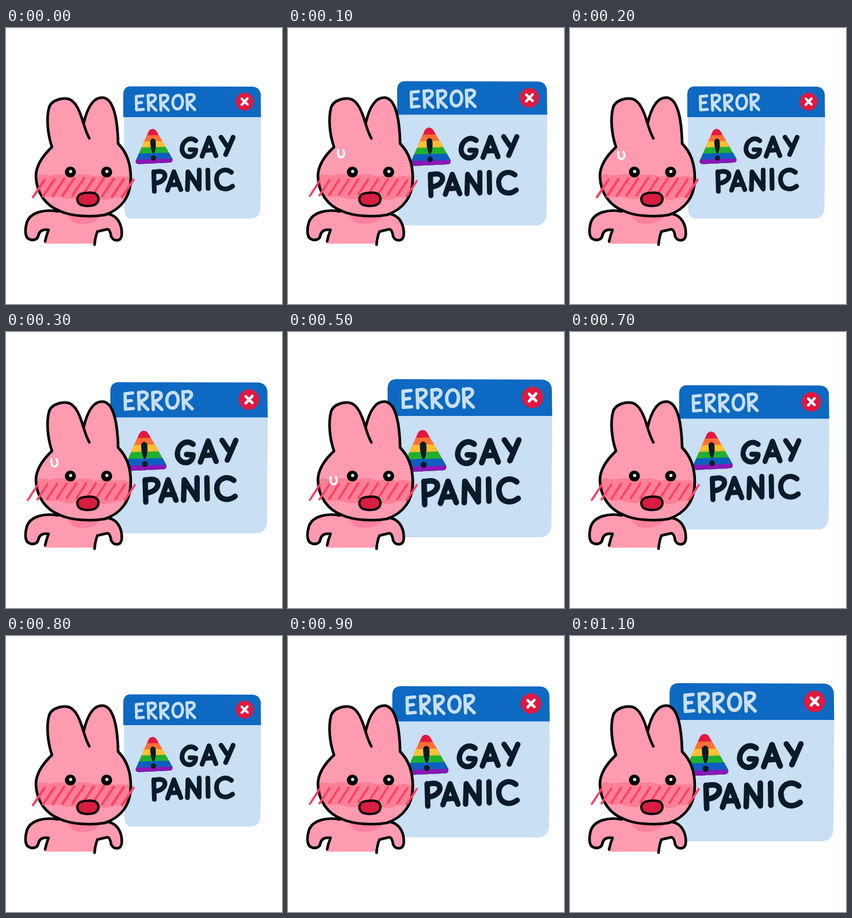
An HTML page for the animation above (1.2 s loop, 480 by 480 pixels).

```html
<!DOCTYPE html>
<html lang="en">
<head>
<meta charset="utf-8">
<title>Error: gay panic</title>
<style>
  html, body { margin: 0; width: 100%; height: 100%; overflow: hidden; background: #fff; }
  svg { display: block; width: 100vw; height: 100vh; }
  .line { fill: none; stroke: #000; stroke-width: 4.6; }
  .pink { fill: #ff9bb0; }
  .hatch { fill: none; stroke: #fd4268; }
  .letters { fill: none; stroke: #0a1a28; stroke-width: 8.2; }
  .head-letters { fill: none; stroke: #c8dff4; stroke-width: 5; }
</style>
</head>
<body>
<svg viewBox="0 0 480 480" stroke-linecap="round" stroke-linejoin="round" role="img" aria-label="ERROR: GAY PANIC">
  <defs>
    <clipPath id="sign">
      <path d="M248 180C251 174 259 174 262 180L288 225C291 230 289 234 284 234L232 236.500C226 237 224 233 227 228Z"/>
    </clipPath>
    <path id="face" d="M80 207C72 184 70 156 75 138C79 126 96 121 107 123C122 126 129 147 135 166
      C141 140 151 121 167 121C187 121 194 158 195 201C210 216 217 238 217 261
      C217 293 201 315 172 325C149 329 114 328 93 318C70 309 53 288 52 258C52 238 65 221 80 207Z"/>
    <clipPath id="faceClip"><use href="#face"/></clipPath>
    <path id="r" d="M0 1L1 27M0 2C15-4 19 10 2 15L14 27"/>
  </defs>

  <g id="panel">
    <path fill="#c8dff4" d="M205 150H443.500L442.500 314Q441 330 427 331.500L219 331.500Q207 331 205.500 317Z"/>
    <path fill="#0d69c1" d="M204 155V114Q205 101 218 101.500L429 102Q441 103 443 115L443.500 155Z"/>
    <g class="head-letters">
      <path d="M238 118L226.500 119L227 142.500L239 141.500M227 130.500L236 129.500"/>
      <use href="#r" x="247" y="116"/>
      <use href="#r" x="268.500" y="116"/>
      <path d="M299 117C287 118 287 141 298.500 141C310 140 310 117 299 117Z"/>
      <use href="#r" x="314.500" y="115"/>
    </g>
    <circle cx="415" cy="128" r="15.500" fill="#e2183e"/>
    <path d="M410 123L420 133M420 122.500L410 133.500" stroke="#fff" stroke-width="4.200"/>
    <g id="bands" clip-path="url(#sign)"></g>
    <path fill="#0a1a28" d="M251 196Q255 189 260 195Q262 207 258 217Q256.500 219 254.500 217Q250.500 207 251 196Z"/>
    <circle cx="256.500" cy="226" r="4.500" fill="#0a1a28"/>
    <g class="letters">
      <path d="M330 196C319 187 306 198 306 211C307 227 329 229 330 212L320 211.500"/>
      <path d="M341 223L353 191L365 222M346 213L361 212"/>
      <path d="M374 190L384 205M395 190L382 220"/>
      <path d="M257 250L258 284M257 251C283 243 282 267 260 270"/>
      <path d="M281 282L292 250L304 281M285 273L301 272"/>
      <path d="M315.500 281L316.500 250L336 280L336 247"/>
      <path d="M351 247L351.500 279"/>
      <path d="M392 251C381 242 366 249 366 263C367 282 384 283 394 275"/>
    </g>
  </g>

  <path class="pink" d="M90 319C70 315 42 319 36 339C33 350 33 359 37 365C44 371 54 369 56 362Q58 350 74 351L66 375
    H154L158 354L177 350Q181 353 183 363C188 372 199 371 201 362C203 346 196 325 172 323Z"/>
  <path d="M107 326Q112 341 134 341Q156 340 164 326Z" fill="#ff819b"/>
  <path class="line" d="M90 319C70 315 42 319 36 339C33 350 33 359 37 365C44 371 54 369 56 362Q58 349 74 351Q70 361 68 371
    M170 323C196 322 203 346 201 362C199 371 188 372 183 363Q181 350 176 350L159 354Q155 364 154 377"/>

  <use href="#face" class="pink"/>
  <path clip-path="url(#faceClip)" fill="#ff7f96"
    d="M50 258Q62 252 75 257Q98 251 118 257Q136 251 154 258Q174 254 190 259Q207 255 220 262V288
    Q207 297 191 294Q177 302 161 297H120Q103 299 89 293Q72 297 50 286Z"/>
  <use href="#face" class="line"/>
  <path class="line" d="M134 163Q139 181 145 192"/>

  <g id="eyes"></g>
  <g id="blushA" class="hatch" stroke-width="4.200"></g>
  <g id="blushB" class="hatch" stroke-width="3.800"></g>
  <path d="M142 286.500C155 285 161 290 161 298C160 306 153 309.500 142 309.500C130 309.500 124 305 124 297C125 289 131 287 142 286.500Z"
    fill="#d91c40" stroke="#000" stroke-width="4"/>
  <path id="drop" d="M-5-6Q-6-1-4 4Q-1 9 3 6Q8 2 4-6" fill="none" stroke="#fff" stroke-width="3.600"/>
</svg>
<script>
const $ = id => document.getElementById(id);
const STEP = 100;
// panel scale, then sweat drop position, for each step
const STEPS = [
  [1], [1.09, 92, 218], [1, 89, 221], [1.143, 84, 227], [1, 81, 240], [1.195, 79, 258],
  [1], [1.09], [1], [1.143], [1], [1.195]
];

function add(parent, tag, attrs) {
  const el = document.createElementNS('http://www.w3.org/2000/svg', tag);
  for (const key in attrs) el.setAttribute(key, attrs[key]);
  parent.appendChild(el);
}

['#e4183e', '#ff7030', '#ffc02f', '#20b030', '#0d5fc1', '#8a17b8'].forEach((fill, i) => {
  const y = 176 + i * 10.4;
  add($('bands'), 'path', { fill, d: `M220 ${i ? y + 1 : 170}L296 ${i ? y - 1 : 170}V242H220Z` });
});

for (const x of [112, 175]) {
  add($('eyes'), 'circle', { cx: x, cy: 250.5, r: 9.6 });
  add($('eyes'), 'circle', { cx: x + 0.5, cy: 249.5, r: 2.7, fill: '#fff' });
}

function hatch(group, count, x0, gap, lean, low, high) {
  for (let i = 0; i < count; i++) {
    const x = x0 + i * gap;
    const lift = 3 * Math.sin(Math.PI * i / (count - 1));
    add(group, 'path', { d: `M${x} ${low - lift}L${x + lean} ${high - lift}` });
  }
}
hatch($('blushA'), 10, 47, 17.2, 20, 294, 264);
hatch($('blushB'), 11, 38, 16.9, 17, 292, 266);

function draw(time) {
  const i = Math.floor(time / STEP) % STEPS.length;
  const [scale, x, y] = STEPS[i];
  const odd = i % 2 === 1;
  $('panel').setAttribute('transform', `translate(362 201) scale(${scale}) translate(-362 -201)`);
  $('blushA').style.display = odd ? 'none' : '';
  $('blushB').style.display = odd ? '' : 'none';
  $('drop').style.display = x ? '' : 'none';
  if (x) $('drop').setAttribute('transform', `translate(${x} ${y})`);
}

const start = performance.now();
function tick() {
  draw(performance.now() - start);
  requestAnimationFrame(tick);
}
tick();
</script>
</body>
</html>
```
